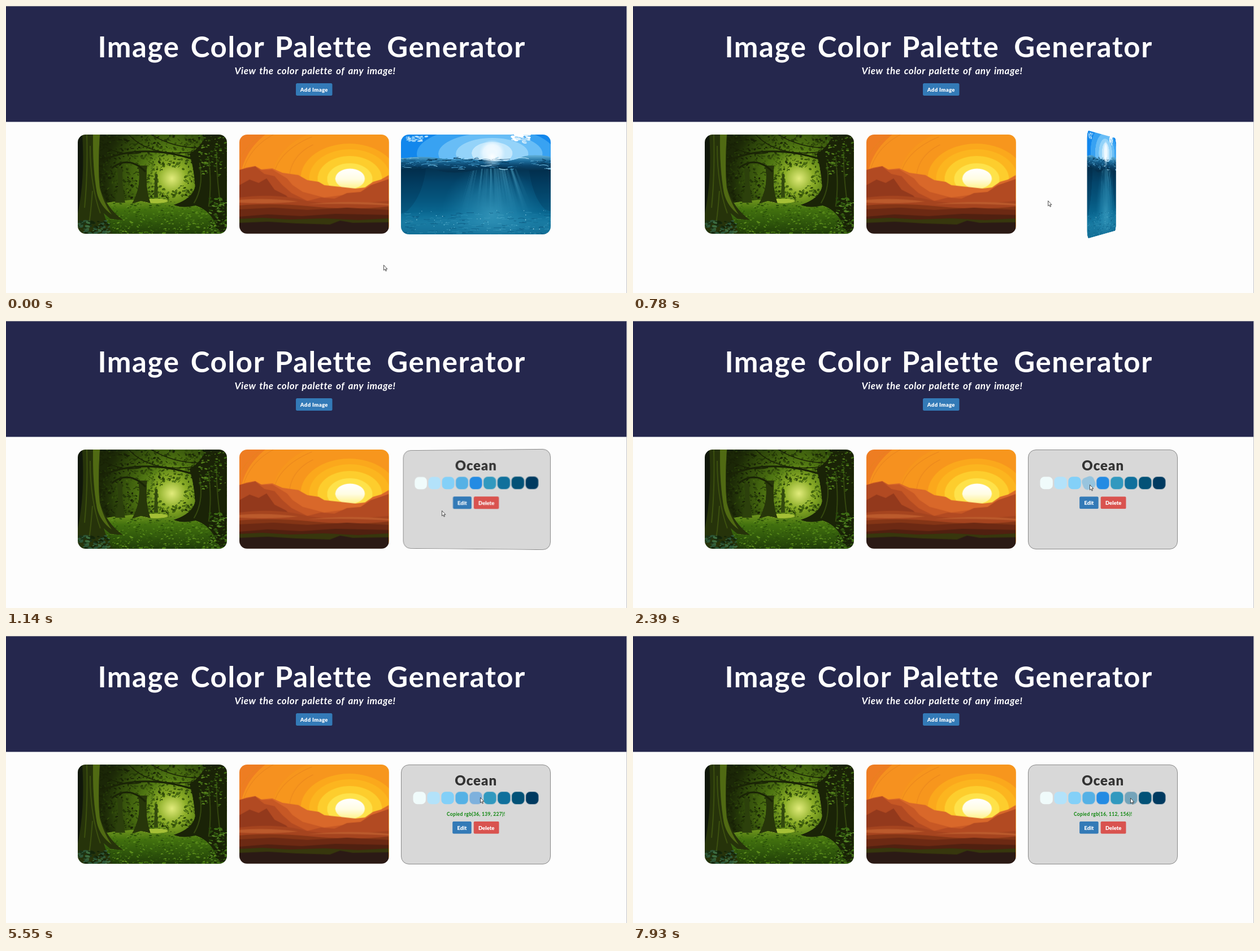
Write an HTML page with a canvas that moves like this. It is 1099 by 509 pixels and loops after 8 s.

```html
<!DOCTYPE html>
<html lang="en">
<head>
<meta charset="utf-8">
<title>Image Color Palette Generator</title>
<style>
html, body { margin: 0; width: 100%; height: 100%; overflow: hidden; background: #fdfdfd; }
#stage { position: absolute; left: 0; top: 0; width: 1099px; height: 509px; overflow: hidden; }
#stage > svg { position: absolute; left: 0; top: 0; }
text { font-family: Lato, "Open Sans", sans-serif; font-weight: 700; text-anchor: middle; }
.h1 { font-size: 51px; letter-spacing: 1.6px; fill: #fff; }
.sub { font-size: 17px; font-style: italic; letter-spacing: .5px; word-spacing: 2px; fill: #fff; }
.btn { font-size: 9.5px; font-weight: 900; fill: #fff; }
.name { font-size: 24px; font-weight: 900; letter-spacing: 1px; fill: #333; }
.note { font-size: 8.5px; letter-spacing: .3px; fill: #0a850a; }
.card { position: absolute; top: 227.7px; width: 264.5px; height: 176.5px; perspective: 1600px; }
.flip { width: 100%; height: 100%; transform-style: preserve-3d; }
.face { position: absolute; inset: 0; border-radius: 14px; overflow: hidden; backface-visibility: hidden; }
.face canvas, .face svg { display: block; width: 100%; height: 100%; }
.back { box-sizing: border-box; background: #d8d8d8; transform: rotateY(180deg); }
.back::after { content: ""; position: absolute; inset: 0; border: 1px solid #8a8a8a; border-radius: 14px; }
.sw { transform-box: fill-box; transform-origin: center; }
</style>
</head>
<body>
<div id="stage">
  <svg width="1099" height="509">
    <rect width="1099" height="205.5" fill="#25274d"/>
    <rect width="1099" height="1" fill="#7d7e8c"/>
    <rect x="1098" width="1" height="509" fill="#c4c4c8"/>
    <text class="h1" y="91"><tspan x="242">Image</tspan> <tspan x="399">Color</tspan> <tspan x="569">Palette</tspan> <tspan x="797">Generator</tspan></text>
    <text class="sub" x="547" y="121">View the color palette of any image!</text>
    <rect x="513" y="137" width="64.500" height="22" rx="2.500" fill="#337ab7"/>
    <text class="btn" x="545.300" y="152" letter-spacing=".35">Add Image</text>
  </svg>
  <div class="card" style="left:126.800px"><div class="face"><canvas id="forest"></canvas></div></div>
  <div class="card" style="left:413.300px"><div class="face"><canvas id="sunset"></canvas></div></div>
  <div class="card" style="left:699.300px">
    <div class="flip" id="flip">
      <div class="face"><canvas id="ocean"></canvas></div>
      <div class="face back">
        <svg viewBox="699.300 227.700 264.500 176.500">
          <text class="name" x="832" y="265">Ocean</text>
          <g id="swatches"></g>
          <g id="notes"></g>
          <g id="buttons">
            <rect x="790.500" y="311" width="33.500" height="22" rx="2.500" fill="#337ab7"/>
            <text class="btn" x="807.300" y="326">Edit</text>
            <rect x="828" y="311" width="45" height="22" rx="2.500" fill="#d9534f"/>
            <text class="btn" x="850.500" y="326">Delete</text>
          </g>
        </svg>
      </div>
    </div>
  </div>
  <svg id="cursor" width="12" height="16" style="overflow:visible">
    <path d="M.5 .5V9.700L2.600 7.900L4.100 11.200L5.400 10.600L4 7.400H6.800Z" fill="#fff" stroke="#222" stroke-width=".8"/>
  </svg>
</div>
<script>
const LOOP = 8000;
const $ = id => document.getElementById(id);

// ---- pictures ----
const W = 264.5, H = 176.5;

function random(seed) {
  return () => {
    seed = (seed * 1664525 + 1013904223) >>> 0;
    return seed / 4294967296;
  };
}

function brush(id, seed) {
  const cv = $(id), c = cv.getContext('2d'), rnd = random(seed);
  cv.width = W * 2;
  cv.height = H * 2;
  c.scale(2, 2);
  const b = {
    c,
    rand: (a, z) => a + (z - a) * rnd(),
    pick: list => list[Math.floor(rnd() * list.length)],
    fill(color, d) { c.fillStyle = color; c.fill(new Path2D(d)); },
    line(color, w, d) { c.strokeStyle = color; c.lineWidth = w; c.stroke(new Path2D(d)); },
    oval(color, x, y, rx, ry = rx, tilt = 0) {
      c.fillStyle = color;
      c.beginPath();
      c.ellipse(x, y, rx, ry, tilt, 0, 7);
      c.fill();
    },
    down(y0, y1, ...colors) {
      const g = c.createLinearGradient(0, y0, 0, y1);
      colors.forEach((k, i) => g.addColorStop(i / (colors.length - 1), k));
      return g;
    },
    glow(x, y, r, ...colors) {
      const g = c.createRadialGradient(x, y, 0, x, y, r);
      colors.forEach((k, i) => g.addColorStop(i / (colors.length - 1), k));
      return g;
    },
    scatter(n, x0, y0, x1, y1, size, colors, flat = 1) {
      for (let i = 0; i < n; i++) {
        const s = b.rand(size * .3, size);
        b.oval(b.pick(colors), b.rand(x0, x1), b.rand(y0, y1), s, s * flat, b.rand(-.5, .5));
      }
    }
  };
  return b;
}

const ALL = `M0 0H${W}V${H}H0Z`;

function forest() {
  const b = brush('forest', 7);
  b.fill('#1b2707', ALL);
  b.fill(b.glow(167, 78, 130, '#e2ec7c', '#8cae28', '#547c14', '#3d5c0e', '#2a400a', '#1b270700'), ALL);
  const tones = ['#56791a', '#45660f', '#324c0b', '#243808', '#182206'];
  for (let i = 0; i < 1300; i++) {
    const x = b.rand(0, W), y = b.rand(0, 122), d = Math.hypot(x - 165, (y - 78) * 1.2);
    if (d < 24) continue;
    const k = Math.min(4, Math.max(0, Math.floor(d / 32 + b.rand(-1, 1.9))));
    b.oval(tones[k], x, y, b.rand(.7, 3.6), b.rand(.6, 2.2), b.rand(-1, 1));
  }
  b.fill(b.down(112, H, '#7a9d22', '#43720f', '#31590c', '#203c08'), `M0 132Q80 112 130 117T${W} 128V${H}H0Z`);
  b.oval('#a5c036', 138, 118, 22, 4);
  b.scatter(600, 30, 122, W, H, 2.6, ['#4f8216', '#2a4f0a', '#3d6a10', '#5c8c1c', '#2f560b'], .5);
  // trunks and branches
  b.fill('#27360a', 'M107 55Q114 92 96 123L112 118L129 122Q119 95 123 55Z');
  b.fill('#2c400c', 'M70 60Q74 95 66 121H84Q78 90 79 60Z');
  b.fill('#334a0e', 'M137 70L135 112H142L141 70Z');
  b.line('#1a2406', 3, 'M38 48Q110 14 206 44M60 60Q90 36 120 66');
  b.line('#1a2406', 1.6, 'M90 0Q130 42 210 30M130 0Q180 30 240 22M40 18Q80 40 112 32');
  b.fill('#1a2307', 'M198 34Q220 22 226 0H264V176H252Q238 134 208 126Q186 132 170 125Q204 114 208 92Q206 60 198 34Z');
  b.line('#34470f', 2, 'M216 50Q224 92 206 122M232 40Q238 90 232 128M246 30Q246 80 254 130');
  b.fill('#26330a', 'M4 0H40Q36 60 40 95Q50 130 80 152L58 150L46 140Q52 160 62 176H0V0Z');
  b.fill('#506a13', 'M27 0H39Q35 60 39 95Q46 122 60 142Q40 128 34 104Q26 60 27 0Z');
  b.line('#3c500f', 2, 'M16 0Q18 70 12 130M22 20Q22 90 40 140M26 100Q24 130 20 160');
  b.fill('#10170a', 'M0 0H8Q13 80 0 140Z');
  b.scatter(130, 214, 0, W, 74, 3, ['#3f6a14', '#2b4c0c', '#192207', '#557f1c'], .5);
  b.scatter(130, 234, 112, W, H, 4, ['#3e6c14', '#294b0c', '#172106', '#538024'], .45);
  b.scatter(70, 0, 154, 56, H, 5, ['#2d5638', '#1a3216', '#3c6a3e', '#142409'], .5);
}

function sunset() {
  const b = brush('sunset', 3);
  b.fill('#ee7d22', ALL);
  b.oval('#f6911f', 170, 82, 168, 122);
  b.oval('#f7961d', 186, 80, 128, 94);
  b.line('#e8841f', .8, 'M0 46Q14 14 42 0M8 60Q20 22 60 0M59 78Q66 30 128 4M88 86Q86 40 130 18');
  b.oval('#fba81c', 194, 78, 86, 62);
  b.oval('#fcb51f', 195, 78, 72, 52);
  b.oval('#fdcd2d', 195, 79, 57, 41);
  b.oval('#fee24a', 195, 79, 40, 28);
  b.oval(b.down(62, 96, '#ffffff', '#fffde4', '#fff38c'), 195.500, 78.500, 26, 18);
  b.fill('#d9682a', 'M0 63L12 59L28 56L38 62L58 60L76 68L104 72L120 81L140 84L150 90L178 93L205 96L222 94L236 84L250 80L264 72V140H0Z');
  b.fill('#c75825', 'M0 63L12 59L28 56L40 63L58 62L84 78L94 90L112 102L150 112L264 96V140H0Z');
  b.fill('#b24a22', 'M0 63L28 57L44 70L62 74L76 90L92 104L120 118L144 112L168 114L190 104L214 102L232 90L264 79V140H0Z');
  b.fill('#93391c', 'M0 90L18 80L34 86L48 78L62 98L82 108L96 122H0Z');
  b.fill('#a5441f', 'M0 112Q60 104 110 116T264 118V140H0Z');
  b.fill('#bb5a2c', 'M0 116Q50 112 104 119Q60 124 0 121ZM120 124Q190 116 264 123V126Q190 122 120 124Z');
  b.fill('#843516', 'M0 126Q60 121 130 128T264 128V150H0Z');
  b.fill('#6c2913', 'M0 133L60 130L120 134L190 130L264 134V160H0Z');
  b.fill('#502010', 'M0 146L50 142L110 145L170 141L264 143V165H0Z');
  b.fill('#37370d', 'M0 150L40 148L90 151L150 149L210 152L264 149V165H0Z');
  b.fill('#2b1a15', 'M0 157L50 155L100 158L160 160L178 153L200 157L264 156V177H0Z');
}

function ocean() {
  const b = brush('ocean', 11), { c } = b;
  b.fill('#1287ec', ALL);
  b.oval('#38a2f2', 150, 34, 122, 48);
  b.oval('#68bdf6', 158, 34, 92, 37);
  b.oval('#94d3f9', 161, 34, 64, 28);
  b.oval('#c4e8fc', 161, 33, 36, 20);
  b.fill(b.glow(161, 33, 24, '#ffffff', '#ffffff', '#e8f7ff', '#d4efff00'), ALL);
  b.scatter(26, 8, 3, 46, 12, 4, ['#8fcdf8', '#b9e0fa'], .45);
  b.scatter(30, 196, 0, 226, 14, 5, ['#d8effc', '#a8d8f8', '#ffffff'], .5);
  // water column
  b.fill(b.down(56, H, '#05304d', '#04466c', '#06577f', '#0b6d97', '#17789e'), `M0 50H${W}V${H}H0Z`);
  b.fill(b.glow(160, 142, 90, '#49abcda0', '#2d93bb70', '#1b7da800'), `M0 60H${W}V${H}H0Z`);
  b.fill(b.down(60, H, '#012a4890', '#023c6060', '#04496f50'), 'M0 60H44Q38 110 10 136L0 140ZM264 60H226Q232 110 254 132L264 136Z');
  for (let i = 0; i < 34; i++) {
    const a = b.rand(-.62, .62), w = b.rand(.6, 4), len = b.rand(45, 92), x = 160 + a * 70;
    const end = x + a * len * .6;
    b.fill(b.down(60, 62 + len, '#62bddd2c', '#3aa0c800'), `M${x} 60L${x + w} 60L${end + w * 3} ${62 + len}L${end} ${62 + len}Z`);
  }
  // surface
  b.fill(b.down(38, 64, '#5aa9d2', '#1e6e9e', '#0a436a', '#05304d'),
    'M0 43Q30 37 60 41T110 44T161 46T210 41T264 39V61Q230 66 200 60T130 63T60 62T0 62Z');
  for (let i = 0; i < 130; i++) {
    const x = b.rand(-8, W), y = b.rand(41, 61), l = b.rand(5, 22);
    const lit = Math.abs(x - 158) < 50 ? '#a9dcf2' : '#72b6d8';
    b.line(b.pick([lit, '#3c8fbd', '#0b426a', '#083857']), b.rand(.4, 1.3),
      `M${x} ${y}q${l / 2} ${b.rand(-4, 3)} ${l} ${b.rand(-2, 2)}`);
  }
  b.fill(b.glow(161, 39, 20, '#ffffffd0', '#d8f2ff70', '#bde8ff00'), 'M132 20H190V62H132Z');
  // sea bed
  b.fill(b.down(134, H, '#2a8bb000', '#2a8bb060', '#0e668f80'), `M0 140Q130 128 ${W} 140V${H}H0Z`);
  for (let i = 0; i < 150; i++) {
    const x = b.rand(0, W), y = b.rand(138, H), l = b.rand(3, 14);
    b.line(b.pick(['#5cb6d250', '#0a587f90', '#3c9fc460', '#08507890']), b.rand(.5, 1.6),
      `M${x} ${y}q${l / 2} ${b.rand(-3, 2)} ${l} 0`);
  }
  b.scatter(70, 4, 134, W, H, .8, ['#a5dcec', '#6bc0da']);
}

forest();
sunset();
ocean();

// ---- card back ----
const NS = 'http://www.w3.org/2000/svg';
function add(parent, tag, attrs, label = '') {
  const el = parent.appendChild(document.createElementNS(NS, tag));
  for (const k in attrs) el.setAttribute(k, attrs[k]);
  el.textContent = label;
  return el;
}

const colors = ['#f0fbfb', '#b3e2fa', '#83d0f8', 'rgb(85, 177, 229)', 'rgb(36, 139, 227)',
  '#3199bf', 'rgb(16, 112, 156)', '#035277', '#003a60'];
const swatches = colors.map((fill, i) => add($('swatches'), 'rect',
  { class: 'sw', x: 720.8 + 24.93 * i, y: 276, width: 22.4, height: 22, rx: 7.5, fill }));

// ---- motion: rows are [ms, value, easing] ----
function play(el, prop, rows) {
  const last = rows[rows.length - 1];
  const frames = [...rows, [LOOP, last[1]]].map(([ms, value, easing = 'linear']) =>
    ({ offset: ms / LOOP, [prop]: value, easing }));
  el.animate(frames, { duration: LOOP, iterations: Infinity });
}
const hold = (el, prop, rows) => play(el, prop, rows.map(([ms, v]) => [ms, v, 'steps(1)']));

play($('flip'), 'transform', [
  [0, 'rotateY(0deg)'], [570, 'rotateY(0deg)', 'ease'], [1370, 'rotateY(180deg)']]);

play($('cursor'), 'transform', [
  [0, 668, 459], [420, 668, 459], [780, 734, 345], [1140, 771, 336], [2010, 808, 290],
  [3770, 808, 290], [3800, 809, 290], [4350, 837, 288], [4900, 837, 288], [5020, 839, 286],
  [6580, 839, 286], [7220, 880, 287]
].map(([ms, x, y]) => [ms, `translate(${x}px, ${y}px)`]));

// hover: swatch, from, to
[[3, 2130, 5290], [4, 5290, 6670], [5, 6670, 7060], [6, 7060]].forEach(([i, from, to]) => {
  const rows = [[0, 1], [from, .5]];
  if (to) rows.push([to, 1]);
  hold(swatches[i], 'opacity', rows);
});

// click: swatch, shake start, note shown, note gone
const shake = [[0, 0], [30, -22], [105, 20], [185, -12], [270, 0]];
const clicks = [[3, 2360, 2420, 5350], [4, 5280, 5350, 6670], [6, 7650, 7720]];
clicks.forEach(([i, start, shown, gone]) => {
  play(swatches[i], 'transform', [[0, 'rotate(0deg)'],
    ...shake.map(([ms, a]) => [start + ms, `rotate(${a}deg)`])]);
  const note = add($('notes'), 'text', { class: 'note', x: 832, y: 319 }, `Copied ${colors[i]}!`);
  const rows = [[0, 0], [shown, 1]];
  if (gone) rows.push([gone, 0]);
  hold(note, 'opacity', rows);
});

const up = 'translateY(0px)', low = 'translateY(17.5px)';
hold($('buttons'), 'transform', [[0, up], [2420, low], [6670, up], [7720, low]]);
</script>
</body>
</html>
```
